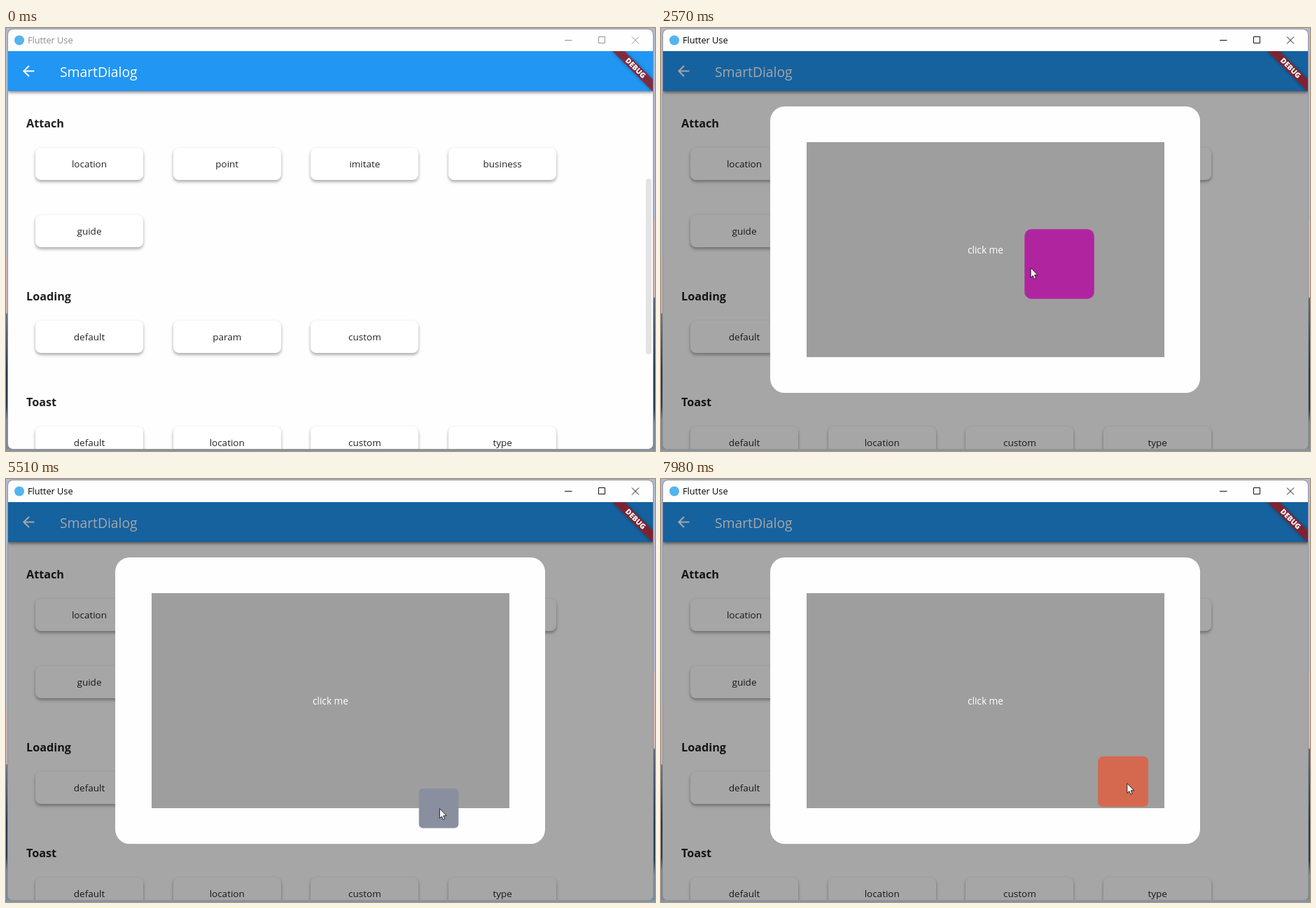
An HTML page that plays this animation: 927 px wide and 604 px high, repeating every 8 s.

```html
<!DOCTYPE html>
<html lang="en">
<head>
<meta charset="utf-8">
<title>SmartDialog</title>
<style>
html, body { margin: 0; width: 100%; height: 100%; overflow: hidden; }
#stage {
  position: relative; width: 927px; height: 604px; overflow: hidden;
  font-family: "Open Sans", "Noto Sans", sans-serif;
  background: linear-gradient(#b4bacb 325px, #cbb2b0 326px 407px, #6c7684 408px, #26384c 492px, #2c3e50 540px, #7b8a95 560px);
}
#stage div, #stage svg { position: absolute; }
#edge {
  right: 0; top: 0; width: 4px; height: 604px;
  background: linear-gradient(#b4bacb 274px, #d9b7b2 275px 384px, #5d6875 386px, #26384c 492px, #2c3e50 545px, #7b8a95 565px);
}
#base { left: 0; bottom: 0; width: 927px; height: 3px; background: #8494a0; }
#window { left: 3px; top: 2px; width: 921px; height: 599px; border-radius: 7px; overflow: hidden; background: #fefefe; box-shadow: 0 0 0 1px #8d95a2; }
/* children keep stage coordinates */
#inner { left: -3px; top: -2px; width: 927px; height: 604px; }
#bar { left: 3px; top: 33px; width: 921px; height: 57px; background: #2196f3; box-shadow: 0 2px 4px rgba(0,0,0,.4), 0 1px 7px rgba(0,0,0,.18); clip-path: inset(0 0 -12px); }
#thumb { left: 914px; top: 215px; width: 8px; height: 251px; border-radius: 4px; background: #e3e3e3; }
.text { white-space: pre; line-height: 24px; }
.head { left: 29px; font-size: 16.2px; font-weight: 700; color: #202020; }
.button {
  width: 154px; height: 46px; line-height: 47px; border-radius: 8px; background: #fff;
  text-align: center; font-size: 13.5px; color: #222;
  box-shadow: 0 3px 4px rgba(0,0,0,.27), 0 1px 4px rgba(0,0,0,.1);
}
#mask { left: 3px; top: 33px; width: 921px; height: 569px; background: rgba(0,0,0,.35); }
#panel { left: 156.4px; top: 112px; width: 614px; height: 409px; border-radius: 20.5px; background: #fefefe; }
#pad {
  left: 51.6px; top: 51px; width: 511px; height: 307px; line-height: 308px;
  background: #9e9e9e; color: #fff; text-align: center; font-size: 13.7px;
}
.box { width: 102.4px; height: 102.4px; border-radius: 10px; }
#press { left: -13px; top: -12.5px; width: 25px; height: 25px; border-radius: 50%; background: rgba(255,255,0,.46); }
#pointer { left: 0; top: 0; }
</style>
</head>
<body>
<div id="stage">
  <div id="edge"></div>
  <div id="base"></div>
  <div id="window"><div id="inner">
    <div id="page"></div>
    <div id="thumb"></div>
    <div id="bar"></div>
    <svg width="927" height="100">
      <path fill="#fff" transform="translate(19.9 49.2) scale(1.024)" d="M20 11H7.83l5.59-5.59L12 4l-8 8 8 8 1.41-1.41L7.83 13H20v-2z"/>
    </svg>
    <div class="text" style="left:77px;top:51px;font-size:19.3px;color:#fff">SmartDialog</div>
    <div id="mask"></div>
    <svg width="927" height="100">
      <defs>
        <clipPath id="client"><path d="M3 33H924V110H3z"/></clipPath>
        <filter id="soft" x="-50%" y="-50%" width="200%" height="200%"><feGaussianBlur stdDeviation="2.5"/></filter>
      </defs>
      <g clip-path="url(#client)">
        <path fill="#000" opacity=".35" filter="url(#soft)" d="M866 33H883.5L924 73.5V91z"/>
        <path fill="rgb(160,25,30)" fill-opacity=".75" d="M866 33H883.5L924 73.5V91z"/>
        <text transform="translate(899.4 57.1) rotate(45)" y="3.7" text-anchor="middle" font-size="10.4" font-weight="800" fill="#fff">DEBUG</text>
      </g>
      <circle cx="19" cy="17.5" r="7" fill="#54b4ee"/>
      <text id="title" x="31" y="22" font-size="12.7">Flutter Use</text>
      <path id="controls" fill="none" d="M798 17.5h10.5M846.5 12.5h9v9h-9zM894 12.5l10 10M904 12.5l-10 10"/>
    </svg>
    <div id="panel"><div id="pad">click me</div></div>
  </div></div>
  <div id="boxes"></div>
  <div id="pointer">
    <svg width="14" height="20" overflow="visible">
      <path d="M.3 .4V14.4L3.4 11.5 5.4 16.3 7.7 15.3 5.7 10.6H10.2z" fill="#fff" stroke="#111" stroke-width=".9"/>
    </svg>
    <div id="press"></div>
  </div>
</div>
<script>
const LOOP = 8000, SIZE = 102.4, GROW = 200, OPEN = 1008, HOLD = 85;
const $ = id => document.getElementById(id);
const clamp = v => Math.min(1, Math.max(0, v));
const smooth = k => k * k * (3 - 2 * k);

function add(parent, cls, css, text = "") {
  const el = document.createElement("div");
  el.className = cls;
  el.style.cssText = css;
  el.textContent = text;
  return parent.appendChild(el);
}

const sections = {
  Attach: "location point imitate business guide",
  Loading: "default param custom",
  Toast: "default location custom type",
};
let middle = 136;
for (const [name, labels] of Object.entries(sections)) {
  add($("page"), "text head", `top:${middle - 12}px`, name);
  const words = labels.split(" ");
  words.forEach((label, i) => add($("page"), "button",
    `left:${42 + i % 4 * 196.7}px;top:${middle + 35 + Math.floor(i / 4) * 96}px`, label));
  middle += 55 + Math.ceil(words.length / 4) * 96;
}

// Direction a box grows from, as the shift of its collapsed slice
const sides = { left: [1, 0], right: [-1, 0], top: [0, 1], bottom: [0, -1], center: [0, 0] };

// Pointer stops: time, x, y; those with a side and colour open a box
const stops = [
  [15, 878, 598],
  [750, 302, 190],
  [OPEN, 302, 190],
  [1310, 396, 243, "left", "#4f8f5f"],
  [1900, 503, 303, "right", "#7a68b8"],
  [2376, 569, 337, "center", "#b024a0"],
  [2870, 415, 356, "left", "#a83cb4"],
  [3368, 271, 251, "right", "#c81134"],
  [3950, 224, 224, "left", "#d8d032"],
  [4447, 234, 352, "center", "#a42530"],
  [4905, 253, 433, "left", "#c9b26a"],
  [5400, 618, 470, "center", "#8a8fa0"],
  [5950, 695, 490, "center", "#ff00ae"],
  [6505, 668, 234, "bottom", "#b78ca8"],
  [7000, 584, 368, "top", "#8ea8e4"],
  [7560, 700, 462],
  [7840, 660, 432, "center", "#d46950"],
  [8250, 700, 448],
];

const boxes = stops.filter(s => s[3]).map(([start, x, y, side, color], i, all) => {
  const [dx, dy] = sides[side];
  const left = x - (dx + 1) * SIZE / 2, top = y - (dy + 1) * SIZE / 2;
  const el = add($("boxes"), "box", `left:${left}px;top:${top}px;background:${color}`);
  return { el, start, end: all[i + 1]?.[0] ?? LOOP, dx, dy };
});
const presses = [OPEN, ...boxes.map(b => b.start)];

// The pointer rests for HOLD on both sides of a stop and eases between stops
function pointAt(t) {
  const i = Math.max(1, stops.findIndex(s => s[0] > t));
  const [t0, x0, y0] = stops[i - 1], [t1, x1, y1] = stops[i];
  const k = smooth(clamp((t - t0 - HOLD) / (t1 - t0 - 2 * HOLD)));
  return [x0 + (x1 - x0) * k, y0 + (y1 - y0) * k];
}

function draw(t) {
  $("mask").style.opacity = clamp((t - OPEN) / GROW);
  $("panel").style.opacity = clamp((t - OPEN) / (GROW - 25));
  $("thumb").style.opacity = 1 - clamp((t - 850) / 250);
  const active = t > OPEN - HOLD;
  $("title").setAttribute("fill", active ? "#000" : "#8c8c8c");
  $("controls").setAttribute("stroke", active ? "#111" : "#929292");

  for (const { el, start, end, dx, dy } of boxes) {
    const p = clamp((t - start) / GROW), rest = (1 - p) * 50;
    el.style.display = t >= start && t < end ? "" : "none";
    if (dx || dy) {
      el.style.transform = `translate(${dx * rest}%, ${dy * rest}%)`;
      el.style.clipPath = `inset(${Math.abs(dy) * rest}% ${Math.abs(dx) * rest}%)`;
    } else el.style.transform = `scale(${p})`;
  }

  const [x, y] = pointAt(t);
  $("pointer").style.display = t < 100 ? "none" : "";
  $("pointer").style.transform = `translate(${x}px, ${y}px)`;
  $("press").style.display = presses.some(s => Math.abs(t - s) < HOLD) ? "" : "none";
}

const began = performance.now();
function tick() {
  draw((performance.now() - began) % LOOP);
  requestAnimationFrame(tick);
}
draw(0);
requestAnimationFrame(tick);
</script>
</body>
</html>
```
